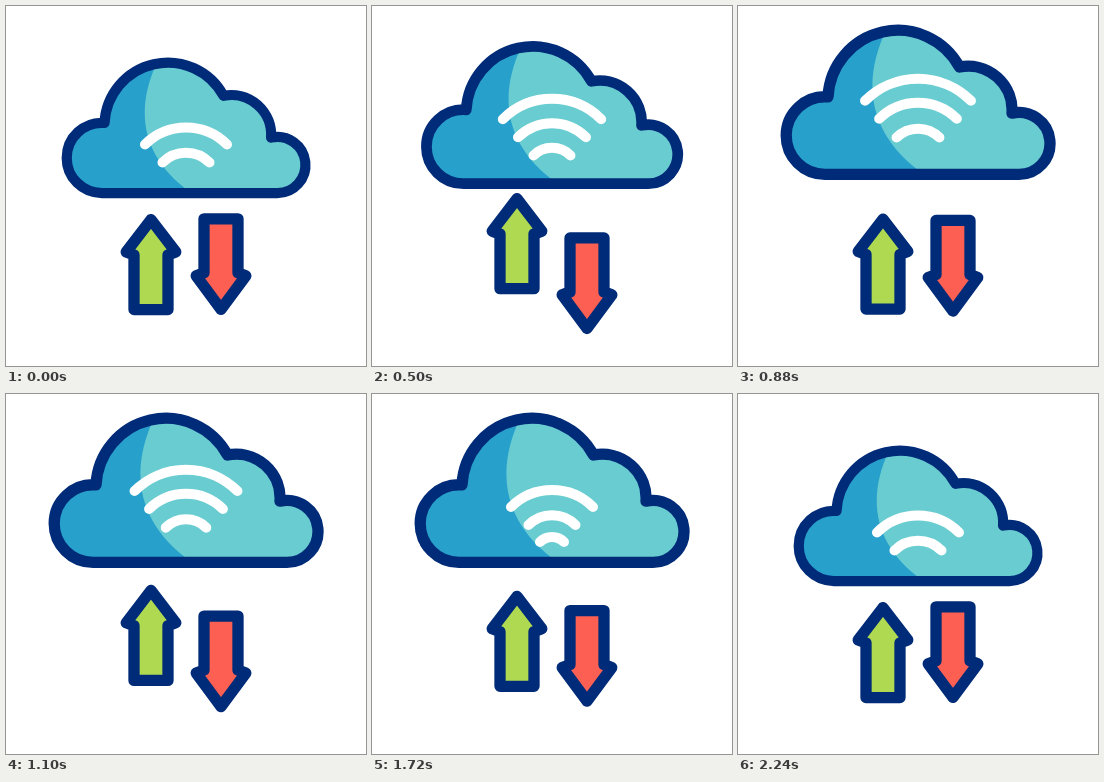
Animation of 360x360 px, one loop 2.4 s. Source, as an HTML page:

```html
<!DOCTYPE html>
<html lang="en">
<head>
<meta charset="utf-8">
<title>Cloud transfer</title>
<style>
  html, body { margin: 0; width: 100%; height: 100%; overflow: hidden; background: #fff; }
  svg { display: block; width: 100%; height: 100%; }
  .outline { stroke: #002b78; stroke-width: 11.3; stroke-linejoin: round; }
  .wave { fill: none; stroke: #fff; stroke-width: 10; stroke-linecap: round; }
</style>
</head>
<body>
<svg viewBox="0 0 360 360">
  <defs>
    <path id="shape" d="M87 168.4A38.8 38.8 0 0 1 48.2 129.6A38.8 38.8 0 0 1 90 90.9A70 70 0 0 1 221.5 61A44 44 0 0 1 274 107.2A31 31 0 1 1 280.6 168.4Z"/>
    <clipPath id="inside"><use href="#shape"/></clipPath>
  </defs>
  <g id="cloud">
    <use href="#shape" fill="#68ccd0"/>
    <path clip-path="url(#inside)" fill="#28a0cc" d="M150 20C124 72 127 127 186 168.4H40V20Z"/>
    <use href="#shape" class="outline" fill="none"/>
  </g>
  <g id="wifi">
    <path class="wave"/>
    <path class="wave"/>
    <path class="wave"/>
  </g>
  <path id="up" class="outline" fill="#b0d952" d="M145 213.6L120.2 246L128 249V303.6H162V249L169.8 246Z"/>
  <path id="down" class="outline" fill="#fd6052" d="M198 212.8H232V266.8L239.8 269.8L215 303.4L190.2 269.8L198 266.8Z"/>
</svg>
<script>
const LOOP = 2400;
const $ = id => document.getElementById(id);
const cloud = $("cloud"), wifi = $("wifi"), up = $("up"), down = $("down");
const waves = [...wifi.children];

// Turning points of each arrow; even entries are at rest, odd ones fully extended.
const upTurns = [200, 515, 850, 1195, 1540, 1885, 2240];
const downTurns = [200, 590, 940, 1300, 1630, 1975, 2240];

const progress = (t, start, end) =>
  Math.min(1, Math.max(0, (t - start) / (end - start)));

function ease(t, start, end) {
  const p = progress(t, start, end);
  return p * p * (3 - 2 * p);
}

const hump = (t, a, b, c, d) => ease(t, a, b) - ease(t, c, d);

const swing = (t, turns) => turns.slice(1).reduce(
  (sum, end, i) => sum + (i % 2 ? -1 : 1) * ease(t, turns[i], end), 0);

const shift = (node, y) => node.setAttribute("transform", `translate(0 ${y})`);

// Quarter-circle arc, given half its width and the height of its ends.
function drawWave(node, half, y) {
  const r = half * Math.SQRT2;
  node.setAttribute("d", `M${180 - half} ${y}A${r} ${r} 0 0 1 ${180 + half} ${y}`);
}

function render(t) {
  const lift = hump(t, 180, 820, 1720, 2240);
  const drop = 25.5 * (1 - lift);
  const scale = 0.905 + 0.095 * lift;
  cloud.setAttribute("transform",
    `translate(180 ${96 + drop}) scale(${scale}) translate(-180 -96)`);

  // The waves open smoothly, then close with growing speed.
  const spread = 13 * (ease(t, 190, 700) - progress(t, 700, 1720) ** 2);
  const small = hump(t, 200, 340, 1740, 1960);
  const rise = 1.45 * spread;
  shift(wifi, drop);
  drawWave(waves[0], 41 + 0.95 * spread, 113 - rise);
  drawWave(waves[1], 23.5 + 1.22 * spread, 131 - rise);
  drawWave(waves[2], (12 + 0.75 * spread) * small, 148 - 0.9 * rise);
  waves[2].style.strokeWidth = 10 * small;
  waves[2].style.display = small > 0.01 ? "" : "none";

  shift(up, -21 * swing(t, upTurns));
  shift(down, 22 * swing(t, downTurns));
}

const origin = performance.now();
function tick(now) {
  render(Math.max(0, now - origin) % LOOP);
  requestAnimationFrame(tick);
}
render(0);
requestAnimationFrame(tick);
</script>
</body>
</html>
```
